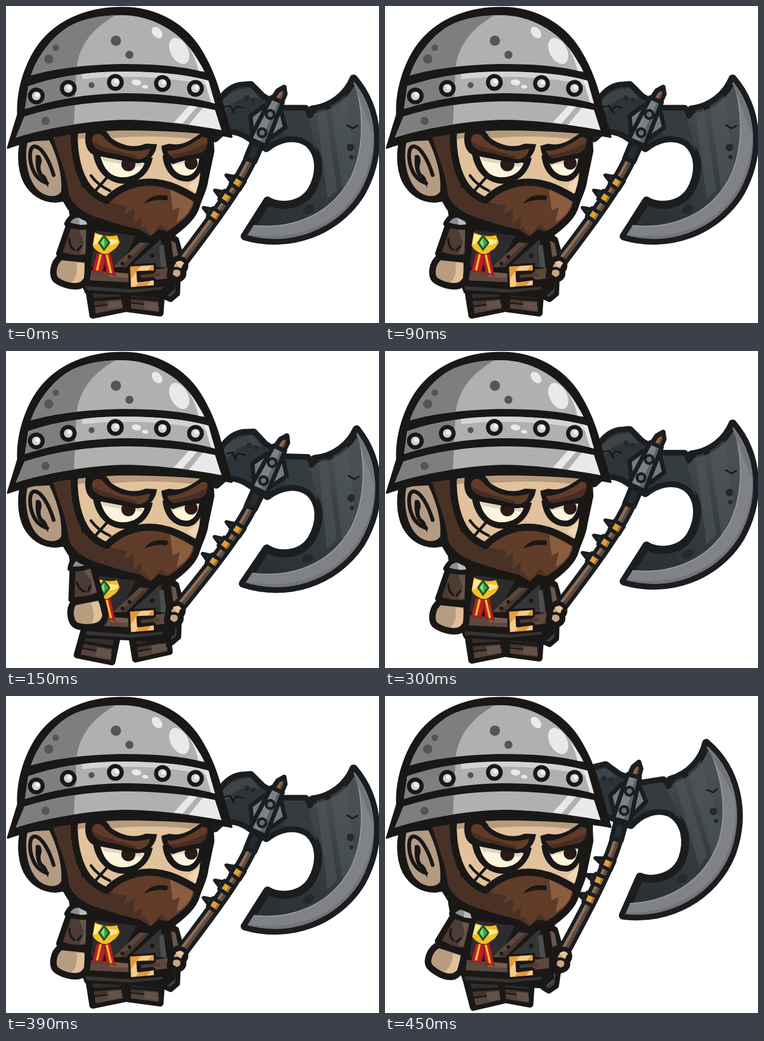
These frames come from a looping animation (689 px wide and 585 px high, 600 ms). An HTML page:

```html
<!DOCTYPE html>
<html lang="en">
<head>
<meta charset="utf-8">
<title>Axe warrior</title>
<style>
html, body { margin: 0; width: 100%; height: 100%; overflow: hidden; background: #fff; }
svg { display: block; width: 100vw; height: 100vh; }
.pose { opacity: 0; animation: .6s step-end infinite; }
#rest { animation-name: rest; }
#drop { animation-name: drop; }
#lift { animation-name: lift; }
@keyframes rest { 0%, 50% { opacity: 1 } 25%, 75%, 100% { opacity: 0 } }
@keyframes drop { 0%, 50%, 100% { opacity: 0 } 25% { opacity: 1 } }
@keyframes lift { 0% { opacity: 0 } 75%, 100% { opacity: 1 } }
.k { fill: #191817; }
.o { stroke: #191817; stroke-linejoin: round; stroke-linecap: round; }
.l { fill: none; stroke: #191817; stroke-linecap: round; stroke-linejoin: round; }
.a { stroke: #1b1e21; stroke-linejoin: round; }
</style>
</head>
<body>
<svg viewBox="0 0 689 585" preserveAspectRatio="none">
<defs>
  <linearGradient id="steel" gradientUnits="userSpaceOnUse" x1="470" y1="390" x2="640" y2="190">
    <stop offset="0" stop-color="#2a3135"/><stop offset=".5" stop-color="#353c40"/><stop offset="1" stop-color="#4a5053"/>
  </linearGradient>
  <linearGradient id="gold" gradientUnits="userSpaceOnUse" x1="229" y1="480" x2="254" y2="499" spreadMethod="repeat">
    <stop offset=".5" stop-color="#e39b3c"/><stop offset=".5" stop-color="#f6c987"/>
  </linearGradient>
  <path id="bladeShape" d="M642 134 C690 190 697 272 657 344 C612 418 522 449 441 425 L483 359
    C505 373 547 370 565 339 C582 308 581 272 557 252 C532 236 502 245 481 262 L450 243 C432 230 415 228 400 231 L386 244
    L384 210 C390 170 415 147 440 147 L452 146 L474 168 L512 190 L553 190 L560 200 L566 191 C602 187 630 163 642 134Z"/>
  <clipPath id="bladeClip"><use href="#bladeShape"/></clipPath>
  <clipPath id="metal">
    <path d="M46 128 C60 86 95 45 130 31 C160 19 190 17 215 17 C270 17 320 48 345 85 C355 100 362 112 367 122 C320 110 270 107 215 107 C150 108 90 115 46 128Z"/>
    <path d="M41 148 C90 131 150 121 215 121 C275 121 335 126 374 138 L386 180 C335 166 275 161 215 161 C150 162 90 172 35 190Z"/>
    <path d="M18 243 L34 204 C90 186 150 177 215 176 C280 176 340 182 386 192 L398 229 C340 218 270 210 215 210 C150 212 70 226 18 243Z"/>
  </clipPath>

  <g id="axe">
    <path class="l" style="stroke:#1b1e21" stroke-width="25" d="M453 280 C430 330 390 385 324 472"/>
    <path fill="none" stroke="#5d4a3e" stroke-width="11" d="M453 280 C430 330 390 385 322 474"/>
    <path fill="none" stroke="#8c6f5a" stroke-width="5" d="M450 280 C427 330 387 385 319 472"/>
    <use href="#bladeShape" class="a" fill="url(#steel)" stroke-width="15"/>
    <g clip-path="url(#bladeClip)">
      <path fill="#2d3438" d="M384 140H520V270H384Z"/>
      <path fill="#3d4448" d="M386 200 C395 170 420 153 452 151 L470 172 C440 163 410 175 396 215Z"/>
      <path fill="#353c40" d="M512 193 L553 193 L575 268 L550 246 L512 238Z"/>
      <path fill="#535a5d" opacity=".5" d="M572 180 L588 180 L612 340 L594 356Z M598 170 L624 150 L648 310 L622 345Z"/>
      <path fill="#808286" stroke="#96989b" stroke-width="2" d="M640 128 C660 182 665 255 638 315 C600 388 525 415 447 404 L420 440 L600 460 L700 320 L700 180Z"/>
      <path fill="#727479" d="M640 138 C687 195 690 270 651 338 C610 408 530 435 445 421 L430 440 L600 460 L710 320Z"/>
    </g>
    <use href="#bladeShape" class="a" fill="none" stroke-width="6"/>
    <path class="l" stroke-width="3" d="M404 186 L414 184 L419 193 L426 185 L437 188 M419 193 L422 197 M630 220 L640 226 L649 221"/>
    <g fill="#23292c"><ellipse cx="559" cy="375" rx="11" ry="8" transform="rotate(-25 559 375)"/>
      <circle cx="636" cy="261" r="7"/><circle cx="638" cy="279" r="4"/><circle cx="445" cy="170" r="5"/><circle cx="457" cy="174" r="4"/></g>
    <g transform="translate(480.5 217) rotate(24)" class="a">
      <path fill="#777a7d" stroke-width="8" d="M-17 -28 L-32 -1 L-19 22 L19 20 L35 -8 L18 -30Z"/>
      <path fill="#94674c" stroke-width="9" d="M-8 -47 L-5 -64 L3 -75 L10 -64 L10 -47Z"/>
      <path fill="#6b4736" d="M4 -69 L7 -62 L7 -50 L3 -50Z" stroke="none"/>
      <path fill="#252b2f" stroke-width="8" d="M-10 42 L10 42 L10 73 L-9 74Z"/>
      <path fill="#7e8185" stroke-width="8" d="M-11 -48 L12 -48 L16 38 L-16 38Z"/>
      <path fill="#5e6165" stroke="none" d="M4 -44 L8 -44 L12 34 L4 34Z"/>
      <g fill="#686b6f" stroke-width="5"><circle cy="-18.5" r="7.5"/><circle cy="18.5" r="7.5"/></g>
    </g>
    <g id="rings"></g>
  </g>

  <g id="torso">
    <path class="k" d="M116 378 L312 405 L316 455 L312 522 L292 540 L225 534 L146 530 L138 510Z"/>
    <path fill="#2d2c2c" d="M165 414 L240 424 L212 478 L156 482Z"/>
    <path fill="#5a473c" d="M247 436 L265 438 L222 482 L198 482Z"/>
    <path fill="#45362e" d="M258 438 L265 438 L222 482 L211 482Z"/>
    <path fill="#353535" d="M262 452 L286 430 L292 483 L235 476Z"/>
    <path fill="#4b4c4e" d="M283 443 L291 440 L297 484 L286 481Z"/>
    <g class="k"><circle cx="270" cy="461" r="4"/><circle cx="228" cy="463" r="3.5"/><circle cx="215" cy="475" r="3.5"/></g>
    <path fill="#5e483d" d="M151 487 L230 494 L230 510 L149 506Z M273 487 L303 483 L303 502 L273 506Z"/>
    <path fill="#795d4e" d="M196 491 L230 494 L230 502 L190 500Z"/>
    <path fill="#353434" d="M147 517 L232 523 L290 518 L288 523 L230 529 L148 524Z"/>
    <path class="o" fill="url(#gold)" stroke-width="4" d="M227 479 L275 476 L275 490 L243 491 L244 508 L275 504 L275 517 L229 521Z"/>
    <path fill="#4d3b32" d="M249 496 L284 493 L284 499 L249 502Z"/>
    <path fill="#b91f26" stroke="#7f171c" d="M168 456 L186 460 L177 494 L169 488 L159 491Z M181 459 L193 457 L202 499 L193 493 L186 496Z"/>
    <path fill="none" stroke="#f3b92d" stroke-width="4" d="M175 458 L168 488 M186 459 L194 493"/>
    <path fill="#f6bd26" d="M164 418 Q186 428 205 423 L210 436 Q205 447 197 451 Q185 463 172 454 Q164 450 160 442Z"/>
    <path fill="#ffea91" d="M165 421 L177 424 L167 440 L161 440Z M191 430 L207 432 L205 438 L192 442Z"/>
    <path fill="#37a447" stroke="#174c28" stroke-width="3" d="M181 424 L191 437 L181 450 L172 437Z"/>
    <path fill="#8cd779" d="M181 428 L182 445 L175 437Z"/>
    <path class="o" fill="#4c3b32" stroke-width="11" d="M297 425 L314 431 L323 463 L305 473Z"/>
    <path fill="#6a564b" d="M306 434 L313 437 L318 460 L309 462Z"/>
  </g>

  <g id="arm">
    <path class="o" fill="#b89c80" stroke-width="12" d="M101 463 C86 474 84 498 93 506 C104 514 124 520 137 516 C150 511 152 500 151 468Z"/>
    <path fill="#e0bf98" d="M130 474 Q143 473 145 478 L144 502 Q136 513 121 510 Q134 498 130 474Z"/>
    <path class="o" fill="#4d3c33" stroke-width="11" d="M116 405 L98 457 Q124 468 152 464 L154 405Z"/>
    <path fill="#67544a" d="M135 413 L148 413 L147 456 L136 458 L144 436Z"/>
    <path class="l" stroke-width="4" d="M117 430 Q117 445 126 450 M139 443 L132 451"/>
    <path class="o" fill="#8d8e91" stroke-width="9" d="M112 402 Q120 385 135 386 Q150 387 155 407 Q134 411 112 402Z"/>
    <path fill="#b9babd" d="M134 391 Q147 391 150 403 L136 404Z"/>
  </g>

  <g id="hand">
    <path class="o" fill="#c6a684" stroke-width="11" d="M306 475 Q318 463 328 470 Q335 480 327 489 Q331 502 314 506 L302 498Z"/>
    <path fill="#e5c49c" d="M313 474 Q323 466 329 475 L322 483Z"/>
    <path class="l" stroke-width="5" d="M308 486 Q316 481 326 489"/>
  </g>
</defs>

<rect width="689" height="585" fill="#fff"/>
<g id="rest" class="pose"></g>
<g id="drop" class="pose"></g>
<g id="lift" class="pose"></g>

<g id="head">
  <path class="o k" stroke-width="2" d="M31 238 C20 262 21 300 33 325 C45 347 65 362 92 362 L106 360 L115 375 C135 397 190 413 238 421 L249 431 L254 426 L268 440 L284 425 L300 431 C330 411 352 390 357 370 C363 350 371 340 373 320 L384 268 L382 232Z"/>
  <path fill="#b39b83" d="M40 250 C32 285 42 330 66 345 C80 354 97 352 102 342 C105 310 92 272 80 248Z"/>
  <path class="l" stroke-width="7" d="M88 312 C80 285 66 260 53 259 C41 260 43 288 51 305 C56 316 65 323 76 327"/>
  <path class="k" d="M55 276 Q65 271 66 287 Q61 300 67 309 Q79 316 78 335 Q68 319 61 313 Q53 302 55 276Z"/>
  <path fill="#4a3126" d="M86 238 C98 280 113 310 116 348 C124 370 150 386 178 393 C205 402 225 408 246 412 L267 425 L282 412 L298 416 C325 400 345 378 347 360 L260 320 L140 335 L125 235Z"/>
  <path fill="#603c29" d="M190 362 C215 342 240 332 262 332 C300 332 330 348 347 362 C345 380 325 400 298 414 L286 402 L268 424 L254 406 L249 411 L251 390 L235 402 L237 374 L218 384 L224 369Z"/>
  <path fill="#8a5d41" d="M303 338 L345 360 C344 374 332 390 315 399 L321 371 L308 377Z"/>
  <path class="k" d="M255 365 Q268 345 298 350 Q301 355 296 359 Q278 355 255 365Z"/>
  <path class="o" fill="#e2c29d" stroke-width="13" d="M126 232 C125 275 134 313 152 335 C162 347 175 355 186 359 C205 338 235 325 265 325 C300 325 330 342 352 356 C358 345 364 330 365 310 L368 232Z"/>
  <path fill="#b59a7c" d="M180 226 H366 V248 Q280 236 196 244Z M133 232 H156 V242 L133 246Z"/>
  <path fill="#f0d7b5" d="M336 333 L357 315 L351 345Z"/>
  <path class="l" stroke-width="5" d="M157 313 Q170 331 192 341 M187 316 L165 341"/>

  <path class="k" d="M160 268 C165 310 193 328 218 328 C248 326 266 306 271 280Z M289 276 C293 310 313 325 338 324 C356 320 365 300 368 274Z"/>
  <path fill="#fcf5dc" d="M174 275 C181 306 198 317 218 316 C240 315 251 303 256 290Z M302 281 C306 304 320 314 336 313 C350 310 356 295 357 278Z"/>
  <path fill="#dcd5bf" d="M175 275 L254 291 L250 297 L181 286Z M303 288 L356 278 L355 286 L306 294Z"/>
  <circle cx="226" cy="292" r="13" fill="#2c1a18"/><circle cx="342" cy="290" r="12" fill="#2c1a18"/>
  <path fill="#fcf5dc" d="M239 297 L252 296 L246 304 L238 303Z"/>
  <path class="k" d="M148 230 C143 255 150 272 166 276 L240 290 C262 291 273 276 277 264 L279 255 L258 254 C235 264 212 256 195 244 L182 228Z
    M287 258 L302 254 C325 260 345 246 362 233 L384 235 L384 262 L376 284 C360 278 330 283 308 292 C295 286 288 274 287 258Z"/>
  <path fill="#603b28" d="M159 246 C159 239 168 232 178 239 C195 261 228 275 266 263 C265 276 253 285 240 282 L195 271 C173 268 159 262 159 246Z
    M298 267 C320 268 345 254 363 241 L372 244 C373 261 367 270 355 272 L310 281 C303 277 299 273 298 267Z"/>
  <path fill="#472d22" d="M160 250 Q181 263 242 277 L240 282 L195 271 C173 268 160 261 160 250Z M303 275 Q342 270 371 252 Q370 269 355 272 L310 281Z"/>

  <path class="o k" stroke-width="3" d="M3 262 L22 200 C20 150 40 90 75 55 C110 20 160 3 215 3 C280 3 330 35 358 78 C375 105 388 135 397 170 L417 242 C370 233 290 228 215 228 C140 230 60 242 3 262Z"/>
  <g clip-path="url(#metal)">
    <path fill="#aeb1b0" d="M0 0H420V270H0Z"/>
    <path fill="none" stroke="#d2d4d3" stroke-width="18" d="M140 126 C215 118 300 120 378 138"/>
    <path fill="#7e7e7e" d="M0 0 H240 C165 28 134 70 130 118 L128 165 L125 225 L0 270Z"/>
    <g fill="#e8e9e8">
      <path d="M270 20 Q342 52 356 122 H400 V60Z M361 120 L400 120 V190 L381 185Z M370 180 L402 180 V235 L337 220Z M345 176 L360 178 L326 217 L310 215Z"/>
      <ellipse cx="279" cy="49" rx="8" ry="12" transform="rotate(-40 279 49)"/>
      <ellipse cx="320" cy="83" rx="16" ry="26" transform="rotate(-28 320 83)"/>
      <ellipse cx="241" cy="141" rx="9" ry="5.5" transform="rotate(8 241 141)"/>
      <ellipse cx="257" cy="149" rx="6" ry="3.5" transform="rotate(8 257 149)"/>
    </g>
  </g>
  <g fill="#555"><circle cx="203" cy="64" r="9.5"/><circle cx="228" cy="90" r="7.5"/><circle cx="92" cy="77" r="6"/>
    <circle cx="79" cy="98" r="8.5"/><circle cx="158" cy="146" r="5.5"/><circle cx="73" cy="212" r="7.5"/></g>
  <g id="rivets"></g>
</g>
</svg>
<script>
const $ = id => document.getElementById(id);

$('rivets').innerHTML = [[56, 166], [115, 152], [202, 141], [289, 143], [350, 152]].map(([x, y]) =>
  `<circle class="k" cx="${x}" cy="${y}" r="15.5"/><circle cx="${x}" cy="${y}" r="8" fill="#cfd1d0"/>
   <circle cx="${x + 2}" cy="${y - 2}" r="4" fill="#f0f1f0"/>`).join('');

$('rings').innerHTML = [[428, 326], [407, 354], [386, 386]].map(([x, y]) =>
  `<g class="a" transform="translate(${x} ${y}) rotate(33)">
   <path fill="#d9982f" stroke-width="7" d="M-8 6 L-25 0 L-8 -7Z"/>
   <path fill="#dfa03a" stroke-width="7" d="M-10 -9 H10 V9 H-10Z"/>
   <path fill="#a86f22" stroke="none" d="M3 -6 H7 V6 H3Z"/></g>`).join('');

const mix = (p, q, t) => [p[0] + (q[0] - p[0]) * t, p[1] + (q[1] - p[1]) * t];

// corners: top left, bottom left, bottom right, top right
function leg([a, b, c, d]) {
  const at = (u, v) => mix(mix(a, b, v), mix(d, c, v), u);
  const quad = (u, v, w, z, fill) =>
    `<polygon fill="${fill}" points="${[at(u, v), at(u, z), at(w, z), at(w, v)].join(' ')}"/>`;
  return `<polygon class="o k" stroke-width="12" points="${[a, b, c, d].join(' ')}"/>` +
    quad(.1, .12, .92, .38, '#352c28') + quad(.1, .5, .92, .66, '#42352f') +
    quad(.1, .72, .95, .95, '#54443c') + quad(.5, .55, .92, .9, '#645148');
}

const poses = {
  rest: {
    axe: '', arm: '', hand: '', butt: '',
    legs: [[[152, 520], [160, 571], [219, 559], [216, 522]], [[224, 522], [225, 559], [285, 567], [288, 524]]]
  },
  drop: {
    axe: 'translate(-3.5 4) rotate(1.8 435 428)', arm: 'translate(4 -6) rotate(-17 133 398)',
    hand: 'translate(-5 0)', butt: 'translate(2 -3)',
    legs: [[[143, 518], [131, 561], [196, 574], [206, 526]], [[232, 526], [239, 569], [302, 555], [298, 518]]]
  },
  lift: {
    axe: 'translate(-1 -19) rotate(-8.85 435 428)', arm: 'translate(11 4) rotate(12 133 398)',
    hand: 'translate(9 1)', butt: 'translate(1 3) rotate(6 305 520)',
    legs: [[[148, 518], [163, 575], [219, 562], [214, 522]], [[214, 522], [219, 560], [268, 569], [271, 524]]]
  }
};

for (const [id, p] of Object.entries(poses)) {
  const part = name => `<use href="#${name}" transform="${p[name]}"/>`;
  $(id).innerHTML =
    `<path class="o" fill="#3a3d41" stroke-width="9" transform="${p.butt}" d="M296 500 L318 505 L317 531 L304 542 L293 537Z"/>
     <path fill="#6a5448" transform="${p.butt}" d="M300 505 L312 508 L309 524 L298 534Z"/>` +
    p.legs.map(leg).join('') + '<use href="#torso"/>' + part('axe') + part('hand') + part('arm');
}
</script>
</body>
</html>
```
